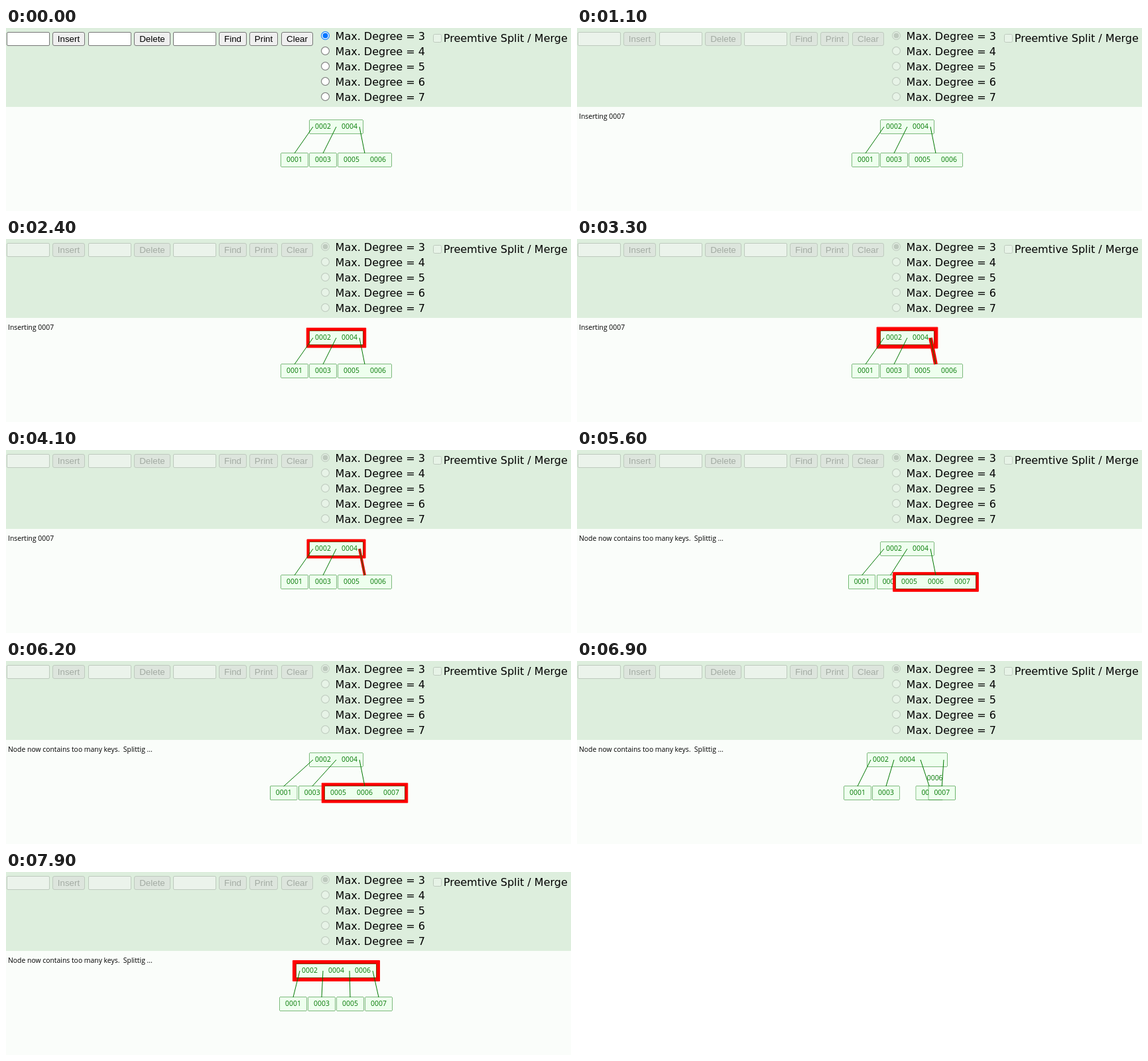
Write an HTML page with a canvas that moves like this. It is 852 px wide and 276 px high and loops after 8000 ms.

```html
<!DOCTYPE html>
<html lang="en">
<head>
<meta charset="utf-8">
<title>B-tree insertion</title>
<style>
  html, body { margin: 0; width: 100%; height: 100%; overflow: hidden; background: #fafdfa; }
  canvas { display: block; }
</style>
</head>
<body>
<canvas id="stage" width="852" height="276"></canvas>
<script>
const ctx = document.getElementById('stage').getContext('2d');

const LOOP = 8000, TICK = 100;
const FOCUS_AT = 300, TYPE_AT = 700, START_AT = 1000;
const STEP = 1112, FIRST_STEP = 1960;
const PULSE = 1560, PULSE_PEAK = 5080;

const GREEN = '#007700', NODE_FILL = '#eeffee', RED = '#ff0000';
const KEY_W = 40, NODE_H = 20, ROOT_X = 498, ROOT_Y = 149, LEAF_Y = 199;
const TREE_FONT = '10.4px "Open Sans", "Noto Sans", sans-serif';
const FORM_FONT = '13.333px "Liberation Sans", Arial, sans-serif';
const PAGE_FONT = '16px "DejaVu Sans", Verdana, sans-serif';

const lerp = (a, b, p) => a + (b - a) * p;

function text(str, x, y, font, color, align = 'left') {
  ctx.font = font;
  ctx.fillStyle = color;
  ctx.textAlign = align;
  ctx.fillText(str, x, y);
}

function box(x, y, w, h, radius, fill, stroke, lineWidth = 1) {
  ctx.beginPath();
  ctx.roundRect(x, y, w, h, radius);
  if (fill) {
    ctx.fillStyle = fill;
    ctx.fill();
  }
  ctx.strokeStyle = stroke;
  ctx.lineWidth = lineWidth;
  ctx.stroke();
}

function disc(x, y, r, fill) {
  ctx.beginPath();
  ctx.arc(x, y, r, 0, 2 * Math.PI);
  ctx.fillStyle = fill;
  ctx.fill();
}

function line(x1, y1, x2, y2, width, color) {
  ctx.beginPath();
  ctx.moveTo(x1, y1);
  ctx.lineTo(x2, y2);
  ctx.lineWidth = width;
  ctx.strokeStyle = color;
  ctx.stroke();
}

// ---- control bar ----

function drawInput(x, off, hover) {
  const border = off ? '#becabe' : hover ? '#4f4f4f' : '#767676';
  box(x + 0.5, 6.5, 64, 20, 1.5, off ? '#ebf3eb' : '#ffffff', border);
}

function drawButton(label, x, w, off) {
  box(x + 0.5, 6.5, w - 1, 20, 2.5, off ? '#dde5dd' : '#efefef', off ? '#becabe' : '#767676');
  text(label, x + w / 2, 21, FORM_FONT, off ? '#a3aba3' : '#000000', 'center');
}

function drawRadio(y, checked, off) {
  const x = 481.5;
  const ring = off ? '#becabe' : checked ? '#0075ff' : '#767676';
  disc(x, y, 6.5, ring);
  disc(x, y, 5.4, off ? '#e7f3e7' : '#ffffff');
  if (checked) disc(x, y, 4, off ? '#becabe' : ring);
}

function drawControls(t) {
  const off = t >= START_AT;
  ctx.fillStyle = '#ddeedd';
  ctx.fillRect(0, 0, 852, 119);

  [1, 124, 252].forEach((x, i) => drawInput(x, off, i === 0 && t >= 100));
  if (t >= FOCUS_AT && !off) {
    box(1, 6, 65, 21, 2, null, '#101010', 2);
    const typed = t >= TYPE_AT;
    if (typed) text('7', 4.5, 21, FORM_FONT, '#000000');
    ctx.fillStyle = '#000000';
    ctx.fillRect(typed ? 12 : 5, 9, 1, 15);
  }

  drawButton('Insert', 70, 49, off);
  drawButton('Delete', 193, 55, off);
  drawButton('Find', 321, 42, off);
  drawButton('Print', 367, 43, off);
  drawButton('Clear', 415, 48, off);

  for (let i = 0; i < 5; i++) {
    drawRadio(11.5 + 23 * i, i === 0, off);
    text('Max. Degree = ' + (i + 3), 496.6, 18 + 23 * i, PAGE_FONT, '#000000');
  }
  box(644.5, 9.5, 12, 12, 2, '#e7f3e7', '#becabe');
  text('Preemtive Split / Merge', 659.8, 21, PAGE_FONT, '#000000');
}

// ---- tree ----

function treeAt(t) {
  const step = Math.floor((t - FIRST_STEP) / STEP);
  const p = (t - FIRST_STEP) / STEP - step;
  const node = (x, y, ...keys) => ({ x, y, keys });
  const root = node(ROOT_X, ROOT_Y, '0002', '0004');
  let leaves, label;

  if (step < 4) {
    const shift = step === 3 ? 20 * p : 0;
    leaves = [node(435 - shift, LEAF_Y, '0001'), node(478 - shift, LEAF_Y, '0003'),
              node(541, LEAF_Y, '0005', '0006')];
    if (step === 3) leaves[2].keys.push('0007');
  } else {
    const q = step === 4 ? p : 1;
    leaves = [415, 458, 541, 541].map((from, i) =>
      node(lerp(from, 433 + 43 * i, q), LEAF_Y, '000' + (2 * i + 1)));
    root.keys.push(step === 4 ? '' : '0006');
    if (step === 4) label = { x: lerp(541, 538, p), y: lerp(LEAF_Y, ROOT_Y, p) };
  }

  const lit = step < 0 || step === 4 ? null : step === 2 || step === 3 ? leaves[2] : root;
  return { root, leaves, label, lit, litEdge: step === 1 ? 2 : -1, splitting: step >= 3 };
}

function drawNode({ x, y, keys }, glow) {
  const w = keys.length * KEY_W, left = x - w / 2, top = y - NODE_H / 2;
  if (glow) {
    box(left - glow, top - glow, w + 2 * glow, NODE_H + 2 * glow, 0, RED, RED);
  }
  box(left, top, w, NODE_H, 0, null, GREEN);
  ctx.fillStyle = NODE_FILL;
  ctx.fillRect(left, top, w, NODE_H);
  keys.forEach((key, i) =>
    text(key, left + KEY_W * (i + 0.5), y + 3, TREE_FONT, GREEN, 'center'));
}

function drawTree(t) {
  const { root, leaves, label, lit, litEdge, splitting } = treeAt(t);
  const phase = Math.abs(t - PULSE_PEAK) % PULSE / PULSE;
  const glow = 3 + 4 * Math.abs(1 - 2 * phase);

  if (t >= START_AT) {
    const message = splitting ? 'Node now contains too many keys.\u00a0 Splittig ...' : 'Inserting 0007';
    text(message, 3, 137, TREE_FONT, '#000000');
  }

  [root, ...leaves].filter(n => n !== lit).forEach(n => drawNode(n));
  if (lit) drawNode(lit, glow);

  const half = root.keys.length * KEY_W / 2;
  leaves.forEach((leaf, i) => {
    const inset = i === 0 ? 5 : i === leaves.length - 1 ? -5 : 0;
    const ends = [root.x - half + KEY_W * i + inset, ROOT_Y, leaf.x, LEAF_Y - NODE_H / 2];
    if (i === litEdge) line(...ends, glow, RED);
    line(...ends, 1, GREEN);
  });
  if (label) text('0006', label.x, label.y + 3, TREE_FONT, GREEN, 'center');
}

function draw(now) {
  const t = Math.floor(now % LOOP / TICK) * TICK;
  ctx.fillStyle = '#fafdfa';
  ctx.fillRect(0, 0, 852, 276);
  drawControls(t);
  drawTree(t);
  requestAnimationFrame(draw);
}

const start = performance.now();
const frame = () => {
  draw(Math.max(0, performance.now() - start));
};
requestAnimationFrame = (native => () => native(frame))(requestAnimationFrame.bind(window));
frame();
</script>
</body>
</html>
```
